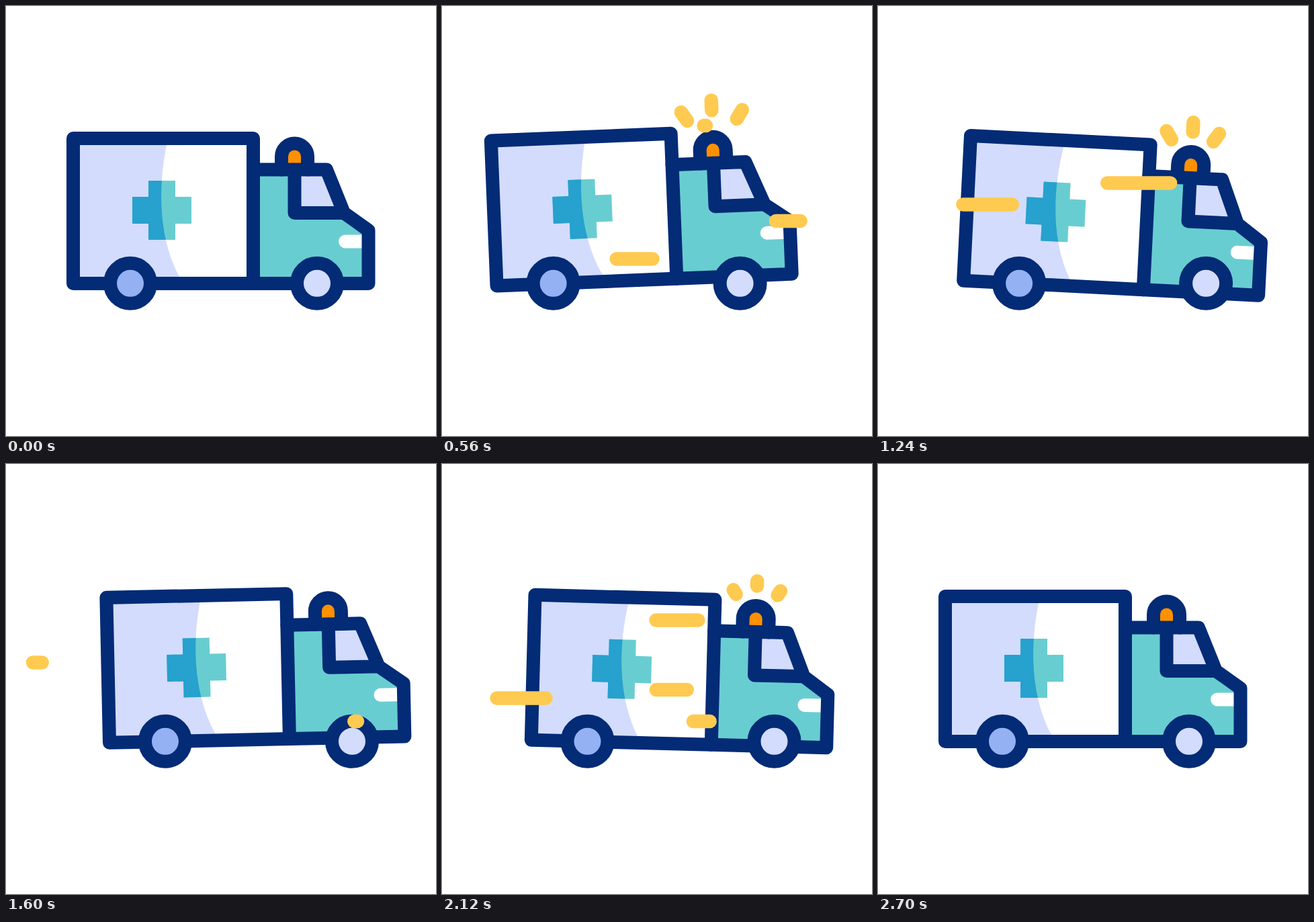
An HTML page that plays this animation: 640x640 px, repeating every 2800 ms.

```html
<!DOCTYPE html>
<html lang="en">
<head>
<meta charset="utf-8">
<title>Ambulance</title>
<style>
  html, body { margin: 0; height: 100%; overflow: hidden; background: #fff; }
  svg { display: block; width: 100%; height: 100%; }
  .line { stroke: #032b76; stroke-width: 20; stroke-linejoin: round; stroke-linecap: round; fill: none; }
  #rays, #streaks { stroke: #ffca50; stroke-width: 20.5; stroke-linecap: round; }
</style>
</head>
<body>
<svg viewBox="0 0 640 640">
  <defs>
    <path id="shade" d="M100 197H241L239 207C226 270 227 345 258 403L262 413H100Z"/>
    <clipPath id="shaded"><use href="#shade"/></clipPath>
    <path id="cross" d="M212 260h40v24h24v40h-24v24h-40v-24h-24v-40h24z"/>
  </defs>
  <g id="body">
    <use href="#shade" fill="#d3dcfd"/>
    <use href="#cross" fill="#68cdd1"/>
    <g clip-path="url(#shaded)"><use href="#cross" fill="#27a1cd"/></g>
    <path d="M368 243.5H477L503 308L540 334V413H368Z" fill="#68cdd1"/>
    <path d="M429.5 243.5H477L503 308H429.5Z" fill="#d3dcfd"/>
    <path d="M540 340.5H505a10 10 0 0 0 0 20H540Z" fill="#fff"/>
    <path class="line" d="M410 243.5V224a19.5 19.5 0 0 1 39 0V243.5" style="fill:#ff9100"/>
    <path class="line" d="M368 243.5H477L503 308L539.5 334V413H368M429.5 243.5V308H503"/>
    <rect class="line" x="100" y="197" width="268" height="216"/>
    <g id="rays"></g>
  </g>
  <g id="wheels">
    <circle class="line" cx="185" cy="412.8" r="30" style="fill:#94b1f3"/>
    <circle class="line" cx="463" cy="412.8" r="30" style="fill:#d3dcfd"/>
  </g>
  <g id="streaks"></g>
</svg>
<script>
const LOOP = 2800, START = 220, END = 2700;
const get = id => document.getElementById(id);

const clamp = p => Math.min(1, Math.max(0, p));
const ease = p => (1 - Math.cos(Math.PI * clamp(p))) / 2;
const mix = (a, b, p) => a + (b - a) * p;
const step = (t, from, to) => ease((t - from) / (to - from));

// The truck backs up, surges forward, then rolls home
const shift = t => -24 * step(t, START, 700) + 76 * step(t, 700, 1610) - 52 * step(t, 1680, END);

// The body rocks on the rear wheel, one swing every 500 ms
const swings = [0, -2.8, 2.95, -1.65, 1.7, 0];
function tilt(t) {
  const beat = clamp((t - 200) / (END - 200)) * 5;
  const i = Math.min(4, Math.floor(beat));
  return mix(swings[i], swings[i + 1], ease(beat - i));
}
const lead = t => 2 * Math.sin(Math.PI * clamp((t - START) / (END - START)));

// Three rays fan out around the lamp: left, middle, right
const rays = [-1, 0, 1].map(side => {
  const drop = Math.abs(side);
  return [430 + 31 * side, 175 + 13 * drop, 430 + 45.5 * side, 150 + 16 * drop];
});
const flashes = [310, 1110, 2035];

// Speed lines: start time, y, right end, left end
const TRAVEL = 540, DELAY = 185;
const streaks = [
  [220, 376.5, 334, 228], [335, 320, 535, 433], [510, 178, 393, 235],
  [792, 263.5, 536, 327], [975, 295.5, 209, 40], [1540, 383, 523, 374],
  [1720, 348.5, 205, 59], [1740, 336, 391, 301], [1800, 232.5, 400, 274]
];

function addLines(parent, count) {
  return Array.from({ length: count }, () =>
    parent.appendChild(document.createElementNS('http://www.w3.org/2000/svg', 'line')));
}

// Shows the part of a segment between its tail and its head
function trim(line, [x0, y0, x1, y1], tail, head) {
  const visible = head > 0 && tail < 1;
  line.style.display = visible ? '' : 'none';
  if (!visible) return;
  line.setAttribute('x1', mix(x0, x1, tail));
  line.setAttribute('y1', mix(y0, y1, tail));
  // A tiny offset keeps the round cap when both ends meet
  line.setAttribute('x2', mix(x0, x1, head) + 0.01);
  line.setAttribute('y2', mix(y0, y1, head));
}

const rayLines = addLines(get('rays'), rays.length);
const streakLines = addLines(get('streaks'), streaks.length);

function draw(t) {
  const x = shift(t);
  get('wheels').setAttribute('transform', `translate(${x})`);
  get('body').setAttribute('transform', `translate(${x + lead(t)}) rotate(${tilt(t)} 185 413)`);

  const since = t - (flashes.filter(f => f <= t).pop() ?? LOOP);
  rays.forEach((ray, i) => trim(rayLines[i], ray, step(since, 110, 430), step(since, 0, 240)));

  streaks.forEach(([start, y, right, left], i) => {
    const age = t - start;
    trim(streakLines[i], [right, y, left, y], ease((age - DELAY) / TRAVEL), ease(age / TRAVEL));
  });
}

const begin = performance.now();
function frame() {
  draw((performance.now() - begin) % LOOP);
  requestAnimationFrame(frame);
}
frame();
</script>
</body>
</html>
```
